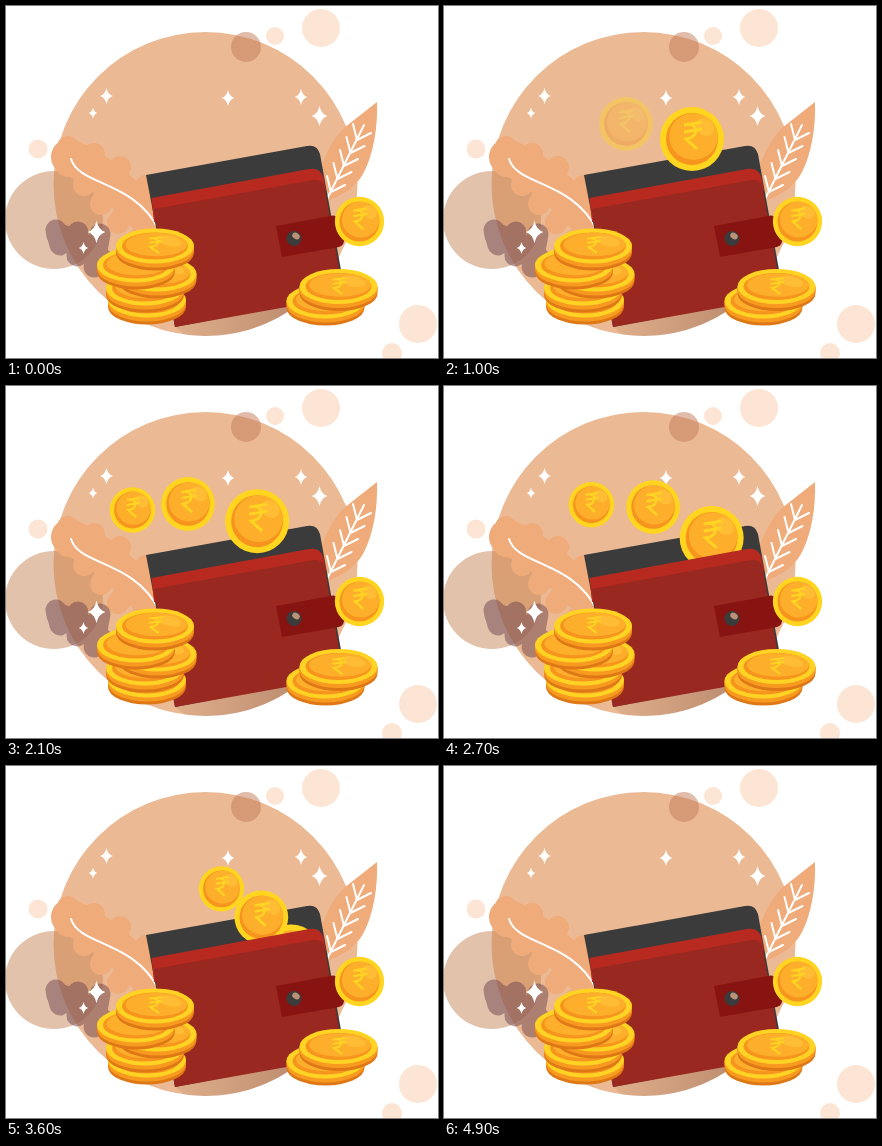
These frames come from a looping animation (432 by 352 pixels, 5000 ms). An HTML page:

```html
<!DOCTYPE html>
<html lang="en">
<head>
<meta charset="utf-8">
<title>Wallet and coins</title>
<style>
  html, body { margin: 0; width: 100%; height: 100%; overflow: hidden; background: #fff; }
  svg { display: block; width: 432px; height: 352px; }
  .pale { fill: #fde5d5; }
  .shade { fill: #c88558; fill-opacity: .5; }
  .lobes { fill: none; stroke: #f0ab7a; stroke-linecap: round; }
  .vein { fill: none; stroke: #fff; stroke-width: 2; stroke-linecap: round; }
</style>
</head>
<body>
<svg viewBox="0 0 432 352">
  <defs>
    <path id="rupee" d="M-8-14 10-17M-8-7 10-10M-4-14.500C6-16 8-2-6 0L5 10" fill="none" stroke="#ffd422" stroke-width="3"/>
    <!-- Upright coin, radius 32 -->
    <g id="coin">
      <circle r="32" fill="#ffd51f"/>
      <circle r="26" fill="#f7941e"/>
      <ellipse cx="1.500" cy="-2.500" rx="24.300" ry="23.300" fill="#fdae2b"/>
      <ellipse cx="13" cy="-12" rx="10" ry="8" transform="rotate(38 13 -12)" fill="#ffbd35"/>
      <use href="#rupee"/>
    </g>
    <!-- Coin lying flat -->
    <g id="flat">
      <path d="M-39 0V7A39 17.500 0 0 0 39 7V0Z" fill="#de7716"/>
      <path d="M-39 0V4A39 17.500 0 0 0 39 4V0Z" fill="#f79a1f"/>
      <ellipse rx="39" ry="17.500" fill="#ffd323"/>
      <ellipse rx="33" ry="13.500" fill="#f7941e"/>
      <ellipse cx="1.500" cy="-1.500" rx="31" ry="11.700" fill="#fdae2b"/>
      <ellipse cx="15" cy="-5" rx="12" ry="5" transform="rotate(12 15 -5)" fill="#ffbd35"/>
    </g>
    <path id="star" d="M0-8Q1.400-1.400 6.400 0Q1.400 1.400 0 8Q-1.400 1.400-6.400 0Q-1.400-1.400 0-8Z" fill="#fff"/>
    <linearGradient id="dusk">
      <stop stop-color="#8a5a48" stop-opacity=".12"/>
      <stop offset="1" stop-color="#8a5a48" stop-opacity=".5"/>
    </linearGradient>
  </defs>

  <circle cx="199.500" cy="178" r="152" fill="#ebba94"/>
  <circle class="shade" cx="48" cy="214" r="49"/>
  <circle cx="240" cy="41" r="15" fill="#c37a58" fill-opacity=".5"/>
  <g class="pale">
    <circle cx="315" cy="22" r="19"/>
    <circle cx="269" cy="30" r="9"/>
    <circle cx="32" cy="143" r="9.500"/>
    <circle cx="412" cy="318" r="19"/>
    <circle cx="386" cy="347" r="10"/>
  </g>

  <path class="lobes" d="M63 151Q100 166 144 214" stroke-width="36"/>
  <path class="lobes" id="fingers" stroke-width="22"/>
  <g opacity=".5">
    <path class="lobes" d="M52 229Q75 234 96 254" style="stroke:#6e4650" stroke-width="23"/>
    <path class="lobes" id="darkFingers" style="stroke:#6e4650" stroke-width="21"/>
  </g>
  <path class="vein" d="M65 153C73 180 128 174 153 224"/>

  <path fill="#f0ab7a" d="M371 96C372 122 367 148 359 164Q350 184 324 194L314 164Q326 130 343 118Z"/>
  <path class="vein" id="ribs" stroke-width="2.500"/>

  <use href="#star" x="100.500" y="90"/>
  <use href="#star" x="222" y="92"/>
  <use href="#star" x="295" y="91"/>
  <use href="#star" transform="translate(87 107) scale(.7)"/>
  <use href="#star" transform="translate(77.500 242) scale(.75)"/>
  <use href="#star" transform="translate(313.500 110) scale(1.250)"/>
  <use href="#star" transform="translate(90.500 226) scale(1.400)"/>

  <path fill="url(#dusk)" d="M169 321 300 292A152 152 0 0 1 178 328.500Z"/>
  <path fill="#3b3b3b" d="M140 169 301 140Q311 138 314 148L335 264Q337 282 330 290L169 321Z"/>
  <g id="moving"></g>
  <path fill="#b82a20" d="M145.500 192 303 163Q313 161 317 170L320 184 148 216Z"/>
  <path fill="#982820" d="M147.500 203 302 175Q314 172 318 178L333 262Q336 285 325 293L169 321Z"/>
  <path fill="#871410" d="M270 220 327 209.500Q333 209 336 220L338 232Q339 239 333 241L276 251Z"/>
  <circle cx="288" cy="232.500" r="7.500" fill="#3b3b3b"/>
  <ellipse cx="290" cy="230" rx="4" ry="3" transform="rotate(35 290 230)" fill="#b99278"/>

  <use href="#coin" transform="translate(353.500 215.500) scale(.77)"/>
  <use href="#flat" x="141" y="294"/>
  <use href="#flat" x="139" y="282"/>
  <use href="#flat" x="151.500" y="268"/>
  <use href="#flat" x="130" y="259"/>
  <use href="#flat" x="149" y="240"/>
  <use href="#rupee" transform="translate(149 241) scale(.75 .6)"/>
  <use href="#flat" x="319.500" y="295"/>
  <use href="#flat" x="332.500" y="280.500"/>
  <use href="#rupee" transform="translate(332.500 282) scale(.75 .6)"/>
</svg>
<script>
const $ = id => document.getElementById(id);
const strokes = (id, count, line) =>
  $(id).setAttribute('d', Array.from({ length: count }, (_, i) => 'M' + line(i)).join(''));

strokes('fingers', 5, i => `${62 + 26 * i} ${141 + 4 * i + 3 * i * i}L${61 + 17 * i} ${160 + 19 * i}`);
strokes('darkFingers', 3, i => `${50 + 22 * i} ${224 + 2 * i}L${54 + 17 * i} ${239 + 11 * i}`);
strokes('ribs', 5, i => {
  const x = 352 - 6.5 * i, y = 132 + 13 * i;
  return `${x + 6} ${y - 13}L${x - 5} ${y + 9}M${x - 5} ${y - 14}L${x - 1} ${y + 2}L${x + 13} ${y - 5}`;
});

// Each coin appears, then falls along a quadratic curve at a steady pace
const coins = [
  { scale: 1, appear: 600, leave: 2000, span: 1870, curve: [[248, 133], [278, 152], [288, 205]] },
  { scale: .84, appear: 900, leave: 2200, span: 2100, curve: [[182, 118], [240, 114], [289, 197]] },
  { scale: .71, appear: 1100, leave: 2440, span: 2450, curve: [[126.5, 124], [226.5, 92.5], [301, 189]] }
];
for (const coin of coins) {
  coin.el = document.createElementNS('http://www.w3.org/2000/svg', 'use');
  coin.el.setAttribute('href', '#coin');
  $('moving').append(coin.el);
}

const clamp = v => Math.max(0, Math.min(1, v));
const along = ([a, b, c], s) =>
  a.map((v, i) => v * (1 - s) ** 2 + b[i] * 2 * s * (1 - s) + c[i] * s * s);

function draw(now) {
  const time = Math.floor(now % 5000 / 100) * 100;
  for (const { el, scale, appear, leave, span, curve } of coins) {
    const s = clamp((time - leave) / span);
    el.setAttribute('transform', `translate(${along(curve, s)}) scale(${scale})`);
    el.setAttribute('opacity', s < 1 ? clamp((time - appear + 100) / 500) : 0);
  }
  requestAnimationFrame(draw);
}
draw(0);
</script>
</body>
</html>
```
